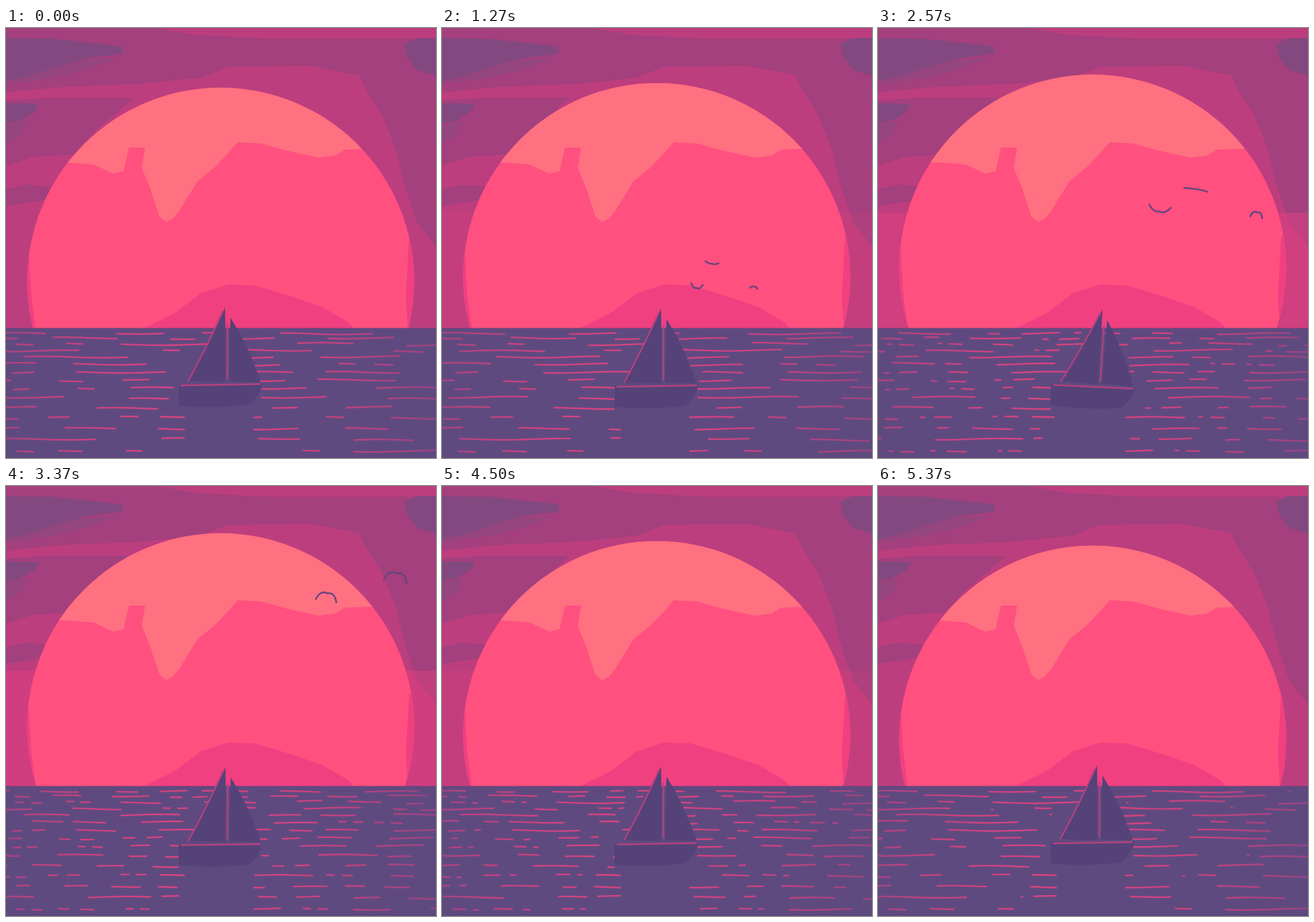
Recreate the animation shown at these times as an HTML page. Size 640 by 640 pixels, loop 5410 ms.

```html
<!DOCTYPE html>
<html lang="en">
<head>
<meta charset="utf-8">
<title>Sailing at sunset</title>
<style>
  html, body { margin: 0; width: 100%; height: 100%; overflow: hidden; background: #bc3e7e; }
  svg { display: block; width: 100%; height: 100%; }
</style>
</head>
<body>
<svg viewBox="0 0 640 640">
  <defs>
    <clipPath id="sunClip"><circle id="sun" cx="319.5" r="288"/></clipPath>
    <clipPath id="openSea">
      <path d="M0 447H322V530H257V570H266V640H0Z M334 447H640V640H368V570H380V530Z"/>
    </clipPath>
    <radialGradient id="glintColor" gradientUnits="userSpaceOnUse" cx="290" cy="560" r="350">
      <stop offset="0" stop-color="#dc447f"/>
      <stop offset=".6" stop-color="#c4427f"/>
      <stop offset="1" stop-color="#9b4480"/>
    </radialGradient>
  </defs>

  <rect width="640" height="640" fill="#bc3e7e"/>
  <g fill="#a3407d">
    <path d="M0 0H225L280 10L390 16H640V325L612 290L592 230L580 180L560 130L535 90L525 70L450 56L330 58L290 74L200 83L80 88L0 96Z"/>
    <path d="M0 108L60 104H190L165 126L130 155L100 188L40 192L0 205Z"/>
    <path d="M0 240L30 233L72 237L64 255L0 265Z"/>
  </g>
  <g fill="#844880">
    <path d="M0 15L70 16L172 27L175 38L120 45L62 66L0 80Z"/>
    <path d="M0 112L48 113L44 124L20 138L0 142Z"/>
    <path d="M592 25L610 15H640V72L612 62L598 45Z"/>
  </g>
  <path d="M50 66L100 50L165 45L120 62L70 74L0 84Z M0 144L30 138L22 158L0 172Z" fill="#95467f"/>
  <path id="glow" d="M0 275H640V447H0Z" fill="#f04080"/>

  <g clip-path="url(#sunClip)">
    <rect width="640" height="640" fill="#ff5080"/>
    <path fill="#ff7080" d="M0 0H640V180H530L505 181L490 190L465 193L420 183L380 172L345 170L330 187L310 208L285 228L258 272L248 284L238 289L228 280L215 240L202 208L207 178H183L175 213L160 217L130 203L90 200H0Z"/>
    <path fill="#f04080" d="M205 447L250 425L290 395L330 382L370 383L420 398L470 415L510 438L518 447Z M598 447L595 400L600 310H640V447Z M0 330H34L37 390L44 447H0Z"/>
  </g>

  <g id="birds" fill="none" stroke="#64457f" stroke-width="2.4" stroke-linecap="round" stroke-linejoin="round"/>

  <rect y="447" width="640" height="193" fill="#5f4a80"/>
  <rect y="446.5" width="640" height="1.5" fill="#6a437e"/>
  <g clip-path="url(#openSea)">
    <path id="glints" fill="none" stroke="url(#glintColor)" stroke-width="2.4" stroke-linecap="round"/>
  </g>

  <g id="boat">
    <path d="M326 416Q327 470 326 527L272 526Q299 475 326 416Z M334 431Q362 475 379 527L332 526Z" fill="#544279"/>
    <path d="M323 421Q298 477 271 526M329.5 440V523" fill="none" stroke="#b5417f" stroke-width="2.2"/>
    <path d="M257 531L382 529Q376 550 362 560Q310 567 257 562Z" fill="#544279"/>
    <path d="M260 532L379 530" stroke="#b5417f" stroke-width="2.4"/>
  </g>
</svg>
<script>
const LOOP = 5410;
const GLINT_STEP = 3610;
const TAU = 2 * Math.PI;
const $ = id => document.getElementById(id);
const clamp = (v, lo, hi) => Math.min(hi, Math.max(lo, v));

function seeded(seed) {
  return () => (seed = seed * 16807 % 2147483647) / 2147483647;
}

// Rows spread apart towards the viewer; each stroke leaves room to slide by half its length.
function makeGlints() {
  const random = seeded(4711);
  const strokes = [];
  for (let row = 0; row < 15; row++) {
    const y = 454 + 7.5 * row + .36 * row * row;
    let x = -40 + 70 * random();
    while (x < 610) {
      const w = 22 + 145 * random() ** 1.7;
      strokes.push({ x, y: y + 3 * random() - 1.5, w, phase: TAU * random() });
      x += 1.5 * w + 15 + 50 * random();
    }
  }
  return strokes;
}
const strokes = makeGlints();

// A stroke grows from its start, slides on, then shrinks into its far end.
function glint({ x, y, w, phase }, age) {
  const head = x + w * clamp(age, 0, 1.5);
  const tail = x + w * Math.max(0, age - 1);
  if (head - tail < 1.5) return "";
  const parts = Math.ceil((head - tail) / 12);
  const points = Array.from({ length: parts + 1 }, (_, i) => {
    const px = tail + (head - tail) * i / parts;
    return px.toFixed(1) + " " + (y + 1.1 * Math.sin(px / 28 + phase)).toFixed(1);
  });
  return "M" + points.join("L");
}

function drawGlints(t) {
  const age = t / GLINT_STEP + 1;
  const next = age - LOOP / GLINT_STEP;
  $("glints").setAttribute("d", strokes.map(s => glint(s, age) + glint(s, next)).join(""));
}

// beat is a time of lowest wings, bend curves the flight path
const birds = [
  { from: [400, 358], to: [581, 130], bend: 2.2, size: 1, beat: 2070 },
  { from: [378, 394], to: [478, 160], bend: 2.2, size: .9, beat: 3420 },
  { from: [458, 392], to: [663, 165], bend: 1.6, size: .7, beat: 2600 }
];
for (const bird of birds) {
  bird.path = document.createElementNS("http://www.w3.org/2000/svg", "path");
  $("birds").append(bird.path);
}

function wings(span, lift) {
  const down = Math.max(0, -lift);
  const tipX = span * (1 - .4 * down);
  const tipY = -span * lift * (lift > 0 ? .55 : .85);
  const bendX = span * .52;
  const bendY = span * lift * (lift > 0 ? .25 : .3);
  return `M${-tipX} ${tipY}Q${-bendX} ${bendY} 0 0Q${bendX} ${bendY} ${tipX} ${tipY}`;
}

function drawBird({ from, to, bend, size, beat, path }, t) {
  const u = Math.max(0, (t - 1000) / 2370);
  const x = from[0] + (to[0] - from[0]) * u ** bend;
  const y = from[1] + (to[1] - from[1]) * u ** 1.6;
  const lift = .25 - Math.cos((t - beat) / 625 * TAU);
  path.setAttribute("d", wings(size * (8 + 15 * u), lift));
  path.setAttribute("transform", `translate(${x} ${y}) rotate(9)`);
  path.setAttribute("opacity", clamp((t - 950) / 250, 0, 1));
}

function drawBoat(t) {
  const tilt = 3.6 * Math.exp(-(((t - 2520) / 520) ** 2));
  const drop = 3 * Math.sin(Math.PI * t / LOOP);
  $("boat").setAttribute("transform", `translate(0 ${drop}) rotate(${tilt} 320 545)`);
}

function drawSun(t) {
  const rise = .5 - .5 * Math.cos((t - 180) / LOOP * TAU);
  $("sun").setAttribute("cy", 377 - 20.3 * rise);
  $("glow").setAttribute("opacity", .4 * rise);
}

function draw(t) {
  drawSun(t);
  drawGlints(t);
  drawBoat(t);
  for (const bird of birds) drawBird(bird, t);
}

const start = performance.now();
function tick() {
  draw((performance.now() - start) % LOOP);
  requestAnimationFrame(tick);
}
tick();
</script>
</body>
</html>
```
